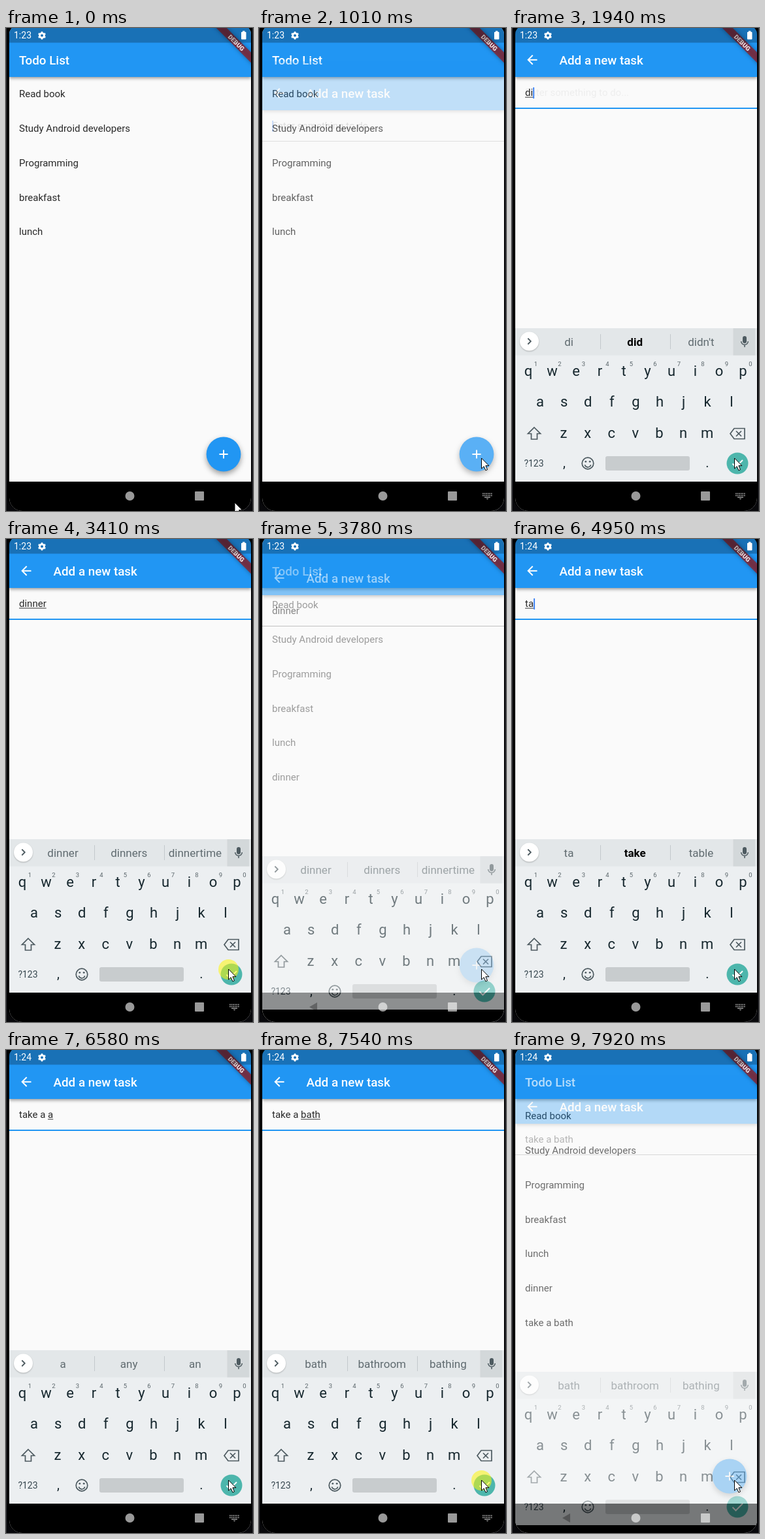
Recreate the animation shown at these times as an HTML page with a canvas. Size 378 by 740 pixels, loop 8 s.

```html
<!DOCTYPE html>
<html lang="en">
<head>
<meta charset="utf-8">
<title>Todo List</title>
<style>
html, body { margin: 0; width: 378px; height: 740px; overflow: hidden; background: #000; }
canvas { display: block; }
</style>
</head>
<body>
<canvas id="stage" width="378" height="740"></canvas>
<script>
const W = 378, H = 740, LOOP = 8000, BLUE = '#2196f3';
const FONT = 'Roboto, "Open Sans", sans-serif';
const main = document.getElementById('stage').getContext('2d');
const layer = document.createElement('canvas');
layer.width = W;
layer.height = H;
const side = layer.getContext('2d');
let g = main;

// Timelines: each row starts with the time it takes effect.
const PAGE = [[0, 0], [840, .24], [1010, .45], [1130, .8], [1180, 1],
  [3780, .7], [3860, .25], [3940, 0],
  [4490, .06], [4550, .28], [4640, .65], [4710, 1], [7850, .78], [7920, .507]];
const KEYS = [[0, 0, 0], [1130, .35, 40], [1180, .8, 12], [1240, 1, 0],
  [3780, .6, 26], [3860, 0, 0],
  [4640, .3, 26], [4710, .75, 12], [4790, 1, 0], [7850, .8, 14], [7920, .5, 33]];
const EMPTY = ['I', 'the', "I'm"];
// time, committed text, composing text, caret, suggestions, hint strength
const TYPING = [
  [0, '', '', 1, EMPTY, .42],
  [1710, '', '', 0, EMPTY, .42],
  [1860, '', 'd', 1, ['d', '*do', 'did'], .15],
  [1940, '', 'di', 1, ['di', '*did', "didn't"], .05],
  [2170, '', 'din', 1, ['din', '*dinner', 'dining']],
  [2240, '', 'dinn', 1, ['dinn', '*dinner', 'dinners']],
  [2310, '', 'dinne', 1, ['dinne', '*dinner', 'dinners']],
  [2540, '', 'dinner', 1, ['dinner', 'dinners', 'dinnertime']],
  [3410, '', 'dinner', 0, ['dinner', 'dinners', 'dinnertime']],
  [3630, 'dinner', '', 0, ['dinner', 'dinners', 'dinnertime']],
  [3940, '', '', 1, EMPTY, .42],
  [4860, '', 't', 1, ['t', '*to', 'the'], .12],
  [4940, '', 'ta', 1, ['ta', '*take', 'table']],
  [5020, '', 'tak', 1, ['tak', '*take', 'taking']],
  [5180, '', 'take', 1, ['take', 'takes', 'taken']],
  [5420, 'take ', '', 1, ['a', 'the', 'care']],
  [5500, 'take ', 'a', 1, ['a', 'any', 'an']],
  [5730, 'take a ', '', 1, ['look', 'break', 'picture']],
  [6120, 'take a ', 'a', 1, ['a', 'any', 'an']],
  [6580, 'take a ', 'a', 0, ['a', 'any', 'an']],
  [6660, 'take a ', '', 1, ['look', 'break', 'picture']],
  [6735, 'take a ', 'b', 1, ['b', '*be', 'by']],
  [6810, 'take a ', 'ba', 1, ['ba', '*bath', 'back']],
  [6980, 'take a ', 'bat', 1, ['bat', 'bath', 'bats']],
  [7130, 'take a ', 'bath', 1, ['bath', 'bathroom', 'bathing']],
  [7540, 'take a ', 'bath', 0, ['bath', 'bathroom', 'bathing']],
  [7690, 'take a bath', '', 0, ['bath', 'bathroom', 'bathing']]];
const CLICKS = [[532, 763], [3410, 3560], [4180, 4330], [7540, 7690]];
const TASKS = ['Read book', 'Study Android developers', 'Programming',
  'breakfast', 'lunch', 'dinner', 'take a bath'];

const at = (rows, t) => rows.reduce((a, r) => r[0] <= t ? r : a);
const during = (spans, t) => spans.some(([a, b]) => t >= a && t < b);

function bezier(x1, y1, x2, y2) {
  const f = (a, b, s) => 3 * (1 - s) * (1 - s) * s * a + 3 * (1 - s) * s * s * b + s ** 3;
  return x => {
    let lo = 0, hi = 1;
    for (let i = 0; i < 24; i++) {
      const m = (lo + hi) / 2;
      if (f(x1, x2, m) < x) lo = m; else hi = m;
    }
    return f(y1, y2, (lo + hi) / 2);
  };
}
const slide = bezier(.4, 0, .2, 1), fade = bezier(.42, 0, 1, 1);

function box(x, y, w, h, color, r = 0) {
  g.fillStyle = color;
  g.beginPath();
  g.roundRect(x, y, w, h, r);
  g.fill();
}
function dot(x, y, r, color) {
  g.fillStyle = color;
  g.beginPath();
  g.arc(x, y, r, 0, 7);
  g.fill();
}
function path(pts, close) {
  g.beginPath();
  for (let i = 0; i < pts.length; i += 2) g.lineTo(pts[i], pts[i + 1]);
  if (close) g.closePath();
}
function line(color, width, ...pts) {
  g.strokeStyle = color;
  g.lineWidth = width;
  path(pts);
  g.stroke();
}
function text(s, x, y, size, color, align = 'left', weight = 400) {
  g.font = `${weight} ${size}px ${FONT}`;
  g.textAlign = align;
  g.fillStyle = color;
  g.fillText(s, x, y);
}
function shadow(color, blur, y) {
  g.shadowColor = color;
  g.shadowBlur = blur;
  g.shadowOffsetY = y;
}

// Paint into a separate layer, then blend it as a whole.
function blend(alpha, dy, paint) {
  if (!alpha) return;
  side.clearRect(0, 0, W, H);
  g = side;
  paint();
  g = main;
  g.globalAlpha = alpha;
  g.drawImage(layer, 0, dy);
  g.globalAlpha = 1;
}

function appBar(title, x) {
  box(5, 0, 370, H, '#fafafa');
  shadow('rgba(0,0,0,.4)', 5, 2);
  box(5, 0, 370, 75, BLUE);
  shadow('transparent', 0, 0);
  text(title, x, 55.5, 18.8, '#fff', 'left', 500);
}

function listPage(t) {
  appBar('Todo List', 20);
  const n = t < 3630 ? 5 : t < 7850 ? 6 : 7;
  TASKS.slice(0, n).forEach((s, i) => text(s, 20, 106.4 + i * 52.75, 15, 'rgba(0,0,0,.84)'));
  shadow('rgba(0,0,0,.38)', 8, 4);
  dot(333, 653, 26.4, BLUE);
  shadow('transparent', 0, 0);
  line('#fff', 2, 326.4, 653, 339.6, 653);
  line('#fff', 2, 333, 646.4, 333, 659.6);
}

function formPage(row, focus) {
  const [, done, part, caret, , hint] = row;
  appBar('Add a new task', 72.5);
  line('#fff', 2, 38.5, 48.8, 25, 48.8);
  line('#fff', 2, 31.7, 41.8, 24.7, 48.8, 31.7, 55.8);
  if (hint) text('Enter something to do...', 20, 104.4, 15, `rgba(0,0,0,${hint})`);
  text(done + part, 20, 104.4, 15, 'rgba(0,0,0,.84)');
  const x = 20 + g.measureText(done).width;
  const end = 20 + g.measureText(done + part).width;
  if (part) box(x, 105.6, end - x, 1, '#333');
  if (caret) box(end, 91, 2, 17, '#4285f4');
  if (focus) box(5, 122, 370, 2, BLUE);
  else box(5, 122, 370, 1, 'rgba(0,0,0,.42)');
}

function keyboard(words) {
  const ink = '#16272e', gray = '#4d5a60';
  box(5, 460, 370, 235, '#eceff1');
  box(5, 460, 370, 41.5, '#e3e7e9');
  box(338.5, 460, 33.5, 41.5, '#d3d8da');
  shadow('rgba(0,0,0,.25)', 2, 1);
  dot(26.5, 480, 14.5, '#fff');
  shadow('transparent', 0, 0);
  line(gray, 1.8, 24.3, 475.5, 28.8, 480, 24.3, 484.5);
  box(135, 469, 1, 23, '#c3c9cc');
  box(242, 469, 1, 23, '#c3c9cc');
  words.forEach((w, i) => {
    const bold = w[0] === '*';
    text(bold ? w.slice(1) : w, 87 + i * 101.2, 487, 17, bold ? '#000' : '#606b70',
      'center', bold ? 700 : 400);
  });
  // microphone
  box(353, 472, 6, 11, gray, 3);
  g.strokeStyle = gray;
  g.lineWidth = 1.5;
  g.beginPath();
  g.arc(356, 480, 5.3, 0, Math.PI);
  g.moveTo(356, 485);
  g.lineTo(356, 489);
  g.stroke();

  [...'qwertyuiop'].forEach((c, i) => {
    text(c, 25 + i * 36.5, 533, 22, ink, 'center');
    text((i + 1) % 10, 36.3 + i * 36.5, 517.5, 9.5, '#5b666b', 'center');
  });
  [...'asdfghjkl'].forEach((c, i) => text(c, 43 + i * 36.6, 580, 22, ink, 'center'));
  [...'zxcvbnm'].forEach((c, i) => text(c, 79 + i * 36.6, 628, 22, ink, 'center'));

  g.strokeStyle = gray;
  g.lineWidth = 1.7;
  path([34, 612, 43.5, 621.5, 38.5, 621.5, 38.5, 630, 29.5, 630, 29.5, 621.5, 24.5, 621.5], true);
  g.stroke();
  path([334, 621.5, 340, 613.5, 356, 613.5, 356, 629.5, 340, 629.5], true);
  g.stroke();
  line(gray, 1.7, 343, 617.5, 351, 625.5);
  line(gray, 1.7, 351, 617.5, 343, 625.5);
  text('?123', 33.5, 672, 14, '#37474f', 'center');
  text(',', 80, 673, 20, ink, 'center');
  text('.', 299, 673, 20, ink, 'center');
  g.lineWidth = 1.7;
  g.strokeStyle = gray;
  g.beginPath();
  g.arc(116, 667, 8.8, 0, 7);
  g.stroke();
  g.beginPath();
  g.arc(116, 668, 4.8, .25, Math.PI - .25);
  g.stroke();
  dot(112.8, 664.3, 1.4, gray);
  dot(119.2, 664.3, 1.4, gray);
  box(143, 656, 129, 22, '#c8ccce', 3);
  dot(345, 667, 16.5, '#4db6ac');
  line('#fff', 2, 337.5, 667.5, 342.5, 672.5, 353, 662);
}

function statusBar(t) {
  // debug ribbon across the corner
  g.save();
  g.beginPath();
  g.rect(5, 0, 370, 695);
  g.clip();
  g.translate(375, 0);
  g.rotate(Math.PI / 4);
  shadow('rgba(0,0,0,.5)', 6, 0);
  box(-50, 26.3, 100, 11.3, 'rgba(150,24,28,.7)');
  shadow('transparent', 0, 0);
  text('DEBUG', 0, 35.4, 9.6, '#f4e8e8', 'center', 900);
  g.restore();
  box(5, 0, 370, 22.5, 'rgba(0,0,0,.25)');
  text(t < 4490 ? '1:23' : '1:24', 12, 16.4, 14, '#fff');
  // gear
  g.strokeStyle = '#fff';
  g.lineWidth = 2.8;
  g.beginPath();
  g.arc(55, 11.5, 3.4, 0, 7);
  g.stroke();
  for (let i = 0; i < 6; i++) {
    const a = i * Math.PI / 3 + Math.PI / 6, c = Math.cos(a), s = Math.sin(a);
    line('#fff', 2.6, 55 + 4 * c, 11.5 + 4 * s, 55 + 6 * c, 11.5 + 6 * s);
  }
  box(362, 4.5, 3.5, 3, '#fff');
  box(360, 6, 7.5, 11.5, '#fff', 1);
}

function navIcons(t) {
  const c = 'rgba(255,255,255,.6)';
  g.fillStyle = 'rgba(0,0,0,.3)';
  path([77, 717, 89, 710, 89, 724], true);
  g.fill();
  dot(189.5, 717, 7, c);
  box(289, 710, 14, 14, c, 1);
  if (!during([[1010, 3630], [4550, 7770]], t)) return;
  for (let r = 0; r < 2; r++)
    for (let i = 0; i < 6; i++) box(342 + i * 2.6, 712.5 + r * 3, 1.7, 1.8, c);
  box(345, 718.2, 9, 1.5, c);
  g.fillStyle = c;
  path([347.5, 720.8, 351.5, 720.8, 349.5, 722.6], true);
  g.fill();
}

function pointer(t) {
  if (during(CLICKS, t)) dot(340.5, 659.5, 15.5, 'rgba(255,245,10,.55)');
  const step = Math.floor((t - 70) / 77) + 1;
  const p = Math.max(0, Math.min(1, step / 5)), e = p * p * (3 - 2 * p);
  g.save();
  g.translate(350 - 9.5 * e, 727 - 68 * e);
  path([0, 0, 0, 16, 3.7, 12.7, 6.4, 18.8, 9, 17.6, 6.4, 11.6, 11.4, 11.6], true);
  g.fillStyle = '#fff';
  g.fill();
  g.strokeStyle = '#000';
  g.lineWidth = 1;
  g.stroke();
  g.restore();
}

function draw(t) {
  const p = at(PAGE, t)[1], [, keyAlpha, drop] = at(KEYS, t), row = at(TYPING, t);
  g = main;
  box(0, 0, W, H, '#08080b');
  box(0, 0, 1, H, '#2b2b2f');
  box(377, 0, 1, H, '#2b2b2f');
  box(2, -30, 374, 770, '#000', 22);
  g.save();
  g.beginPath();
  g.roundRect(5, -4, 370, 744, [14, 14, 20, 20]);
  g.clip();
  if (p < 1) listPage(t);
  blend(fade(p), p < 1 ? Math.round(174 * (1 - slide(p))) : 0,
    () => formPage(row, keyAlpha === 1));
  statusBar(t);
  box(5, 695, 370, 45, '#000');
  blend(keyAlpha, drop, () => keyboard(row[4]));
  navIcons(t);
  g.restore();
  pointer(t);
}

const start = performance.now();
function tick() {
  draw((performance.now() - start) % LOOP);
  requestAnimationFrame(tick);
}
tick();
</script>
</body>
</html>
```
